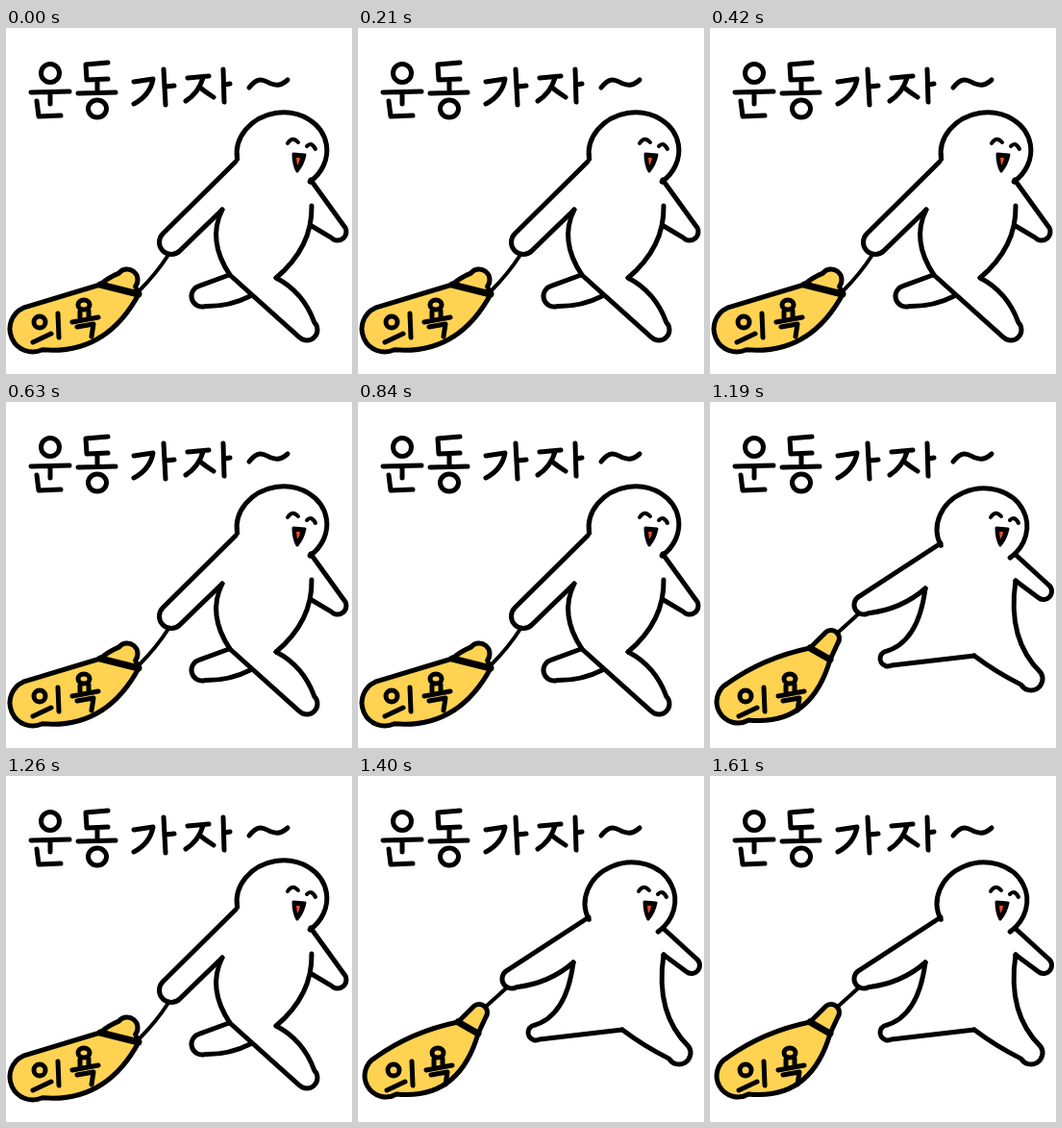
Write an HTML page with a canvas that moves like this. It is 360 px wide and 360 px high and loops after 1.68 s.

```html
<!DOCTYPE html>
<html lang="ko">
<head>
<meta charset="utf-8">
<title>운동 가자~</title>
<style>
  html, body { margin: 0; width: 100%; height: 100%; overflow: hidden; background: #fff; }
  canvas { display: block; width: 360px; height: 360px; }
</style>
</head>
<body>
<canvas id="stage" width="360" height="360" role="img" aria-label="운동 가자~ 의욕"></canvas>
<script>
const ctx = document.getElementById('stage').getContext('2d');
const STEP = 70;
const LINE = 5;
const INK = '#000', YELLOW = '#ffd252', TONGUE = '#e8502c';

// Rounded shape reaching from two root points to a round tip; bends bow its sides outward.
function limb({ roots: [x1, y1, x2, y2], tip: [x, y, r], bends: [b1, b2] = [0, 0] }) {
  const axis = Math.atan2(y - (y1 + y2) / 2, x - (x1 + x2) / 2);
  const nx = Math.sin(axis), ny = -Math.cos(axis);
  const control = (rx, ry, side, bend) => [
    (rx + x + side * r * nx) / 2 + side * bend * nx,
    (ry + y + side * r * ny) / 2 + side * bend * ny
  ];
  const path = new Path2D();
  path.moveTo(x1, y1);
  path.quadraticCurveTo(...control(x1, y1, 1, b1), x + r * nx, y + r * ny);
  path.arc(x, y, r, axis - Math.PI / 2, axis + Math.PI / 2);
  path.quadraticCurveTo(...control(x2, y2, -1, b2), x2, y2);
  return path;
}

function curve([x, y, ...rest]) {
  const path = new Path2D();
  path.moveTo(x, y);
  path.quadraticCurveTo(...rest);
  return path;
}

function ellipse(x, y, rx, ry, tilt = 0, from = 0, to = 2 * Math.PI) {
  const path = new Path2D();
  path.ellipse(x, y, rx, ry, tilt, from, to);
  return path;
}

function ink(path, width = LINE) {
  ctx.lineWidth = width;
  ctx.stroke(path);
}

function fill(path, color) {
  ctx.fillStyle = color;
  ctx.fill(path);
}

function shifted([x, y], paint) {
  ctx.save();
  ctx.translate(x, y);
  paint();
  ctx.restore();
}

// Halfway between two values, lists or nested poses.
function halfway(a, b) {
  if (typeof a === 'number') return (a + b) / 2;
  if (Array.isArray(a)) return a.map((v, i) => halfway(v, b[i]));
  return Object.fromEntries(Object.keys(a).map(key => [key, halfway(a[key], b[key])]));
}

const crossed = {
  head: [287, 129], neck: 3.13, face: [0, 0],
  nearArm: { roots: [225, 189, 239, 139], tip: [172, 223, 12.5], bends: [0, 0] },
  farArm: { roots: [317, 158, 318, 206], tip: [345, 212, 9], bends: [0, 0] },
  frontLeg: { roots: [281, 260, 233, 257], tip: [313, 314, 11], bends: [12, 0] },
  backLeg: { roots: [254, 279, 232, 257], tip: [204, 279, 11], bends: [6, 0] },
  leftSide: [225, 189, 209, 221, 233, 257],
  rightSide: [318, 185, 319, 228, 281, 260],
  bag: { roots: [138, 277, 98, 267], tip: [28, 313, 24], bends: [38, 0] },
  knot: { roots: [98, 267, 138, 277], tip: [126, 262, 11], bends: [2, 0] },
  rope: [139, 273, 156, 256, 169, 236], label: [0, 0]
};

const spread = {
  head: [283, 131], neck: 2.85, face: [-1, 0],
  nearArm: { roots: [224, 194, 240, 147], tip: [160, 211, 10], bends: [10, 0] },
  farArm: { roots: [317, 158, 318, 186], tip: [347, 197, 8.5], bends: [0, 0] },
  frontLeg: { roots: [318, 186, 275, 264], tip: [334, 288, 12], bends: [-26, 3] },
  backLeg: { roots: [275, 264, 224, 194], tip: [185, 267, 8], bends: [0, -28] },
  leftSide: [224, 194, 224, 194, 224, 194],
  rightSide: [318, 186, 318, 186, 318, 186],
  bag: { roots: [125, 268, 104, 256], tip: [29, 312, 22], bends: [44, 10] },
  knot: { roots: [104, 256, 125, 268], tip: [126, 246, 8.5], bends: [0, 0] },
  rope: [134, 239, 144, 230, 155, 220], label: [2, 0]
};

const poses = [crossed, halfway(crossed, spread), spread];

const syllables = [
  'M26 67L66 66M46 67V79M32 76L34 92L57 91',
  'M106 36L83 38L84 54L106 53M95 54V67M75 68L114 67',
  'M133 56L153 53Q150 70 133 79M164 43L166 80M166 61L175 60',
  'M189 52L211 50M205 52Q200 68 187 76M202 62Q208 67 216 72M226 43L227 77M227 59L233 58',
  'M253 62C264 48 270 56 276 58S286 60 293 54'
].map(d => new Path2D(d));

const label = new Path2D(
  'M28 327L47 318M54 297L55 322M77 295V301M86 294V300M69 306L96 301M74 311L91 308L89 321');

function drawTitle() {
  ink(ellipse(46, 47, 9.5, 9.5));
  ink(ellipse(95, 84, 9.5, 9));
  syllables.forEach(strokes => ink(strokes));
}

function drawBag(pose) {
  const parts = [limb(pose.knot), limb(pose.bag)];
  parts.forEach(part => fill(part, YELLOW));
  parts.forEach(part => ink(part));
  const [x1, y1, x2, y2] = pose.bag.roots;
  ink(new Path2D(`M${x1} ${y1}L${x2} ${y2}`), 7);
  ink(curve(pose.rope), 4);
  shifted(pose.label, () => {
    ink(ellipse(35, 306, 6, 6));
    ink(ellipse(81, 288, 6, 5));
    ink(label);
  });
}

function drawBody(pose) {
  ink(ellipse(...pose.head, 47, 41, -0.15, pose.neck, 2 * Math.PI + 1.03));
  for (const part of ['nearArm', 'farArm', 'frontLeg', 'backLeg']) ink(limb(pose[part]));
  for (const side of ['leftSide', 'rightSide']) ink(curve(pose[side]));
}

function drawFace() {
  ink(new Path2D('M293 120Q298 112 304 119M313 123Q318 118 322 126'), 4);
  const mouth = new Path2D('M299 131L311 132Q309 142 303 149Q299 142 299 131Z');
  fill(mouth, INK);
  ink(mouth, 3);
  fill(new Path2D('M302 135L306 135Q306 139 303 143Z'), TONGUE);
}

function draw(time) {
  const pose = poses[Math.floor(time / STEP) % poses.length];
  ctx.fillStyle = '#fff';
  ctx.fillRect(0, 0, 360, 360);
  ctx.strokeStyle = INK;
  ctx.lineCap = ctx.lineJoin = 'round';
  drawTitle();
  drawBag(pose);
  drawBody(pose);
  shifted(pose.face, drawFace);
}

function tick() {
  draw(performance.now());
  requestAnimationFrame(tick);
}
tick();
</script>
</body>
</html>
```
